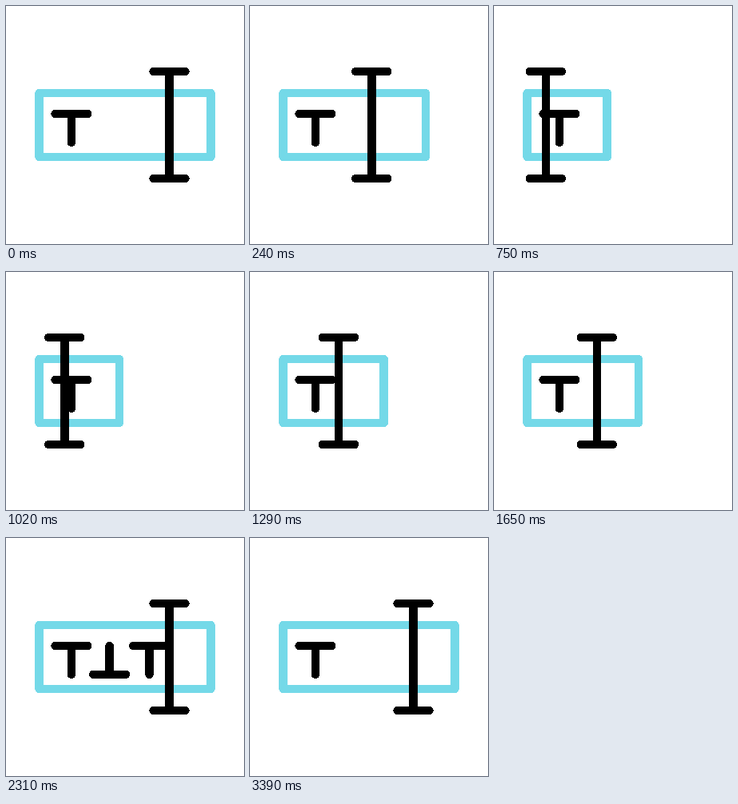
These frames come from a looping animation (298x298 px, 3.6 s). An HTML page:

```html
<!DOCTYPE html>
<html>
<head>
<meta charset="utf-8">
<style>
html, body { margin: 0; width: 100%; height: 100%; overflow: hidden; background: #fff; }
svg { display: block; width: 100vw; height: 100vh; shape-rendering: crispEdges; }
path, rect { fill: none; stroke: #000; stroke-width: 10.5; stroke-linecap: round; stroke-linejoin: round; }
#field { stroke: #74d9e8; }
</style>
</head>
<body>
<svg viewBox="0 0 298 298">
  <defs><path id="letter" d="M-20.25 0H20.25M0 0V35.8"/></defs>
  <rect id="field" x="41.5" y="109" height="80"/>
  <use href="#letter" transform="translate(81.9 135)"/>
  <use id="second" href="#letter" transform="translate(129.6 170.8) scale(1 -1)"/>
  <use id="third" href="#letter" transform="translate(179.5 135)"/>
  <path id="cursor" d="M-20 82H20M-20 216H20M0 82V216"/>
</svg>
<script>
const LOOP = 3600, TICK = 30;
const el = id => document.getElementById(id);
const field = el('field'), cursor = el('cursor'), second = el('second'), third = el('third');

const progress = (t, start, end) => Math.min(1, Math.max(0, (t - start) / (end - start)));
const easeOut = u => 1 - (1 - u) ** 1.27;
const easeInOut = u => (1 - Math.cos(Math.PI * u)) / 2;
const typed = (t, start, end) => easeInOut(progress(t, start, end));
const show = (node, on) => node.setAttribute('visibility', on ? 'visible' : 'hidden');

function draw(t) {
  // The field closes once, then reopens in one push per letter.
  const close = progress(t, 0, 810);
  const one = typed(t, 810, 1500), two = typed(t, 1575, 1950), three = typed(t, 1950, 2310);
  const x = 204.5 - 145 * easeOut(close) + 65.3 * one + 42.7 * two + 37 * three;
  const right = 256.5 - 124 * close + 44.5 * one + 40.5 * two + 39 * three;

  cursor.setAttribute('transform', `translate(${x})`);
  field.setAttribute('width', right - 41.5);
  show(second, t >= 1740 && t < 3390);
  show(third, t >= 2190 && t < 2940);
}

const origin = performance.now();
function frame() {
  const t = (performance.now() - origin) % LOOP;
  draw(Math.floor(t / TICK) * TICK);
  requestAnimationFrame(frame);
}
frame();
</script>
</body>
</html>
```
